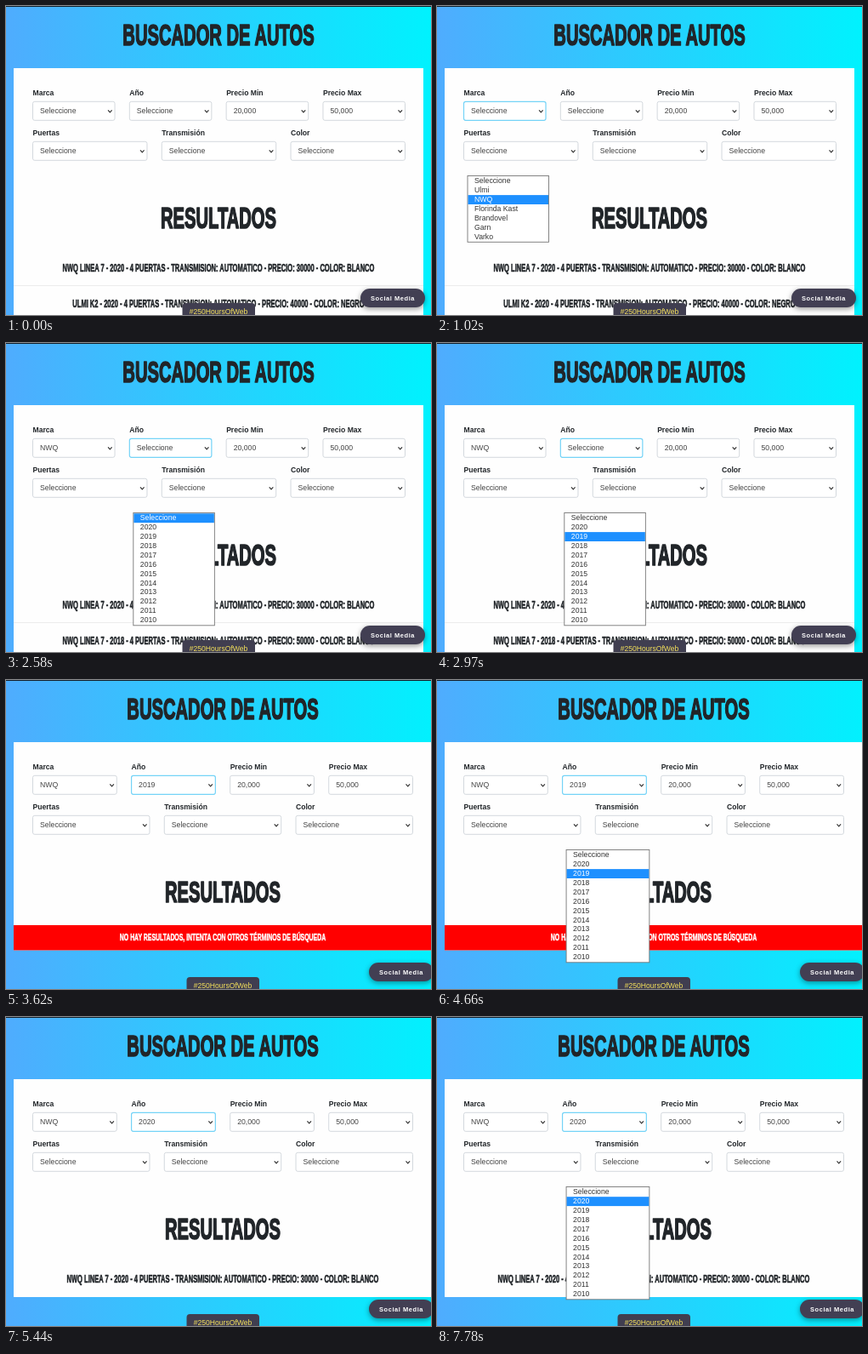
Recreate the animation shown at these times as an HTML page. Size 500 by 363 pixels, loop 8000 ms.

```html
<!DOCTYPE html>
<html lang="es">
<head>
<meta charset="utf-8">
<title>Buscador de autos</title>
<style>
  html, body { margin: 0; width: 100%; height: 100%; overflow: hidden; }
  svg { display: block; width: 100vw; height: 100vh; }
  text { font: 8.7px "Liberation Sans", Arial, sans-serif; fill: #444; white-space: pre; }
  .label { font-size: 8.6px; font-weight: bold; fill: #212529; }
  .display { font-weight: bold; text-anchor: middle; stroke-linejoin: round; }
  .pill { font-size: 7.5px; font-weight: bold; letter-spacing: .55px; fill: #fff; }
  .tag { font-size: 8.6px; fill: #f3e05a; text-anchor: middle; }
  .shadow { filter: drop-shadow(0 2px 3px #0006); }
</style>
</head>
<body>
<svg viewBox="0 0 500 363" preserveAspectRatio="none"></svg>
<script>
const LOOP = 8000, DARK = '#212529', NONE = 'Seleccione';
const svg = document.querySelector('svg');

const BRANDS = [NONE, 'Ulmi', 'NWQ', 'Florinda Kast', 'Brandovel', 'Garn', 'Varko'];
const YEARS = [NONE, ...Array.from({ length: 11 }, (_, i) => String(2020 - i))];

const car = (model, year, price, color) =>
  `${model} - ${year} - 4 PUERTAS - TRANSMISION: AUTOMATICO - PRECIO: ${price} - COLOR: ${color}`;
const WHITE_CAR = car('NWQ LINEA 7', 2020, 30000, 'BLANCO');
const ALL = [WHITE_CAR, car('ULMI K2', 2020, 40000, 'NEGRO')];
const BRAND = [WHITE_CAR, car('NWQ LINEA 7', 2018, 50000, 'BLANCO')];

// Each step overrides the previous state; focus 0 = brand, 1 = year; hover = open list item
const steps = [
  [0, { brand: NONE, year: NONE, focus: -1, hover: -1, cars: ALL }],
  [500, { focus: 0, hover: 0 }],
  [890, { hover: 1 }],
  [1020, { hover: 2 }],
  [1930, { brand: 'NWQ', hover: -1, cars: BRAND }],
  [2580, { focus: 1, hover: 0 }],
  [2840, { hover: 1 }],
  [2970, { hover: 2 }],
  [3620, { year: '2019', hover: -1, cars: [] }],
  [4660, { hover: 2 }],
  [4920, { hover: 0 }],
  [5180, { hover: 1 }],
  [5440, { year: '2020', hover: -1, cars: [WHITE_CAR] }],
  [7780, { hover: 1 }],
];

const rect = (x, y, w, h, fill, extra = '') =>
  `<rect x="${x}" y="${y}" width="${w}" height="${h}" fill="${fill}" ${extra}/>`;
const text = (x, y, str, extra = '') => `<text x="${x}" y="${y}" ${extra}>${str}</text>`;

// Condensed heavy headline face
const display = (x, y, size, str, color = DARK) =>
  `<g transform="translate(${x} ${y}) scale(.585 1)">` +
  text(0, 0, str, `class="display" stroke="${color}" stroke-width="${size * .05}"
    style="font-size:${size}px;fill:${color}"`) + '</g>';

function field(x, y, w, label, value, focused) {
  const border = focused
    ? 'stroke="#74d3f7" stroke-width="1.2"'
    : 'stroke="#ced4da" stroke-width=".9"';
  return text(x, y - 7, label, 'class="label"') +
    rect(x, y + .3, w, 22, '#fff', `rx="2.2" ${border}`) +
    text(x + 8.5, y + 14.4, value) +
    `<path d="M${x + w - 8} ${y + 10.3}l2.3 2.5 2.3-2.5" fill="none" stroke="#333" stroke-width="1.2"/>`;
}

function list(x, w, items, hover) {
  const pitch = 10.9, top = 199.5;
  return rect(x, top, w, items.length * pitch + 1.5, '#fff', 'stroke="#777" stroke-width=".9"') +
    rect(x + .5, top + .8 + hover * pitch, w - 1, pitch, '#1e90ff') +
    items.map((item, i) => text(x + 8, top + 8.7 + i * pitch, item,
      `style="fill:${i === hover ? '#fff' : '#333'}"`)).join('');
}

function render({ brand, year, focus, hover, cars }) {
  // A short page has no scrollbar, so the layout is wider
  const short = cars.length < 2;
  const extra = short ? 10 : 0, mid = 250 + extra / 2;
  const left = 31.5, gap = 17.3, inner = short ? 447 : 438;
  const bottom = short ? (cars.length ? 329 : 317.5) : 363;

  const row = (y, fields) => {
    const w = (inner - gap * (fields.length - 1)) / fields.length;
    return fields.map(([label, value], i) =>
      field(left + i * (w + gap), y, w, label, value, y < 150 && i === focus)).join('');
  };

  let out = `<defs><linearGradient id="sky"><stop stop-color="#4facfe"/>
    <stop offset="1" stop-color="#00f2fe"/></linearGradient></defs>` +
    rect(0, 0, 500 + extra, 363, 'url(#sky)') +
    rect(0, 0, 510, 1, '#16202a') +
    display(mid, 46, 34.5, 'BUSCADOR DE AUTOS') +
    rect(9, 73, 482 + extra, bottom - 73, '#fefefe') +
    row(112, [['Marca', brand], ['Año', year], ['Precio Min', '20,000'], ['Precio Max', '50,000']]) +
    row(159, [['Puertas', NONE], ['Transmisión', NONE], ['Color', NONE]]) +
    display(mid, 261, 34.5, 'RESULTADOS');

  if (!short) out += rect(9, 328, 482, 1, '#ececec');
  cars.forEach((line, i) => out += display(mid, 312.4 + i * 41.4, 12.9, line));
  if (!cars.length) {
    out += rect(9, 288, 482 + extra, 29.5, '#f00') +
      display(mid, 306, 11.8, 'NO HAY RESULTADOS, INTENTA CON OTROS TÉRMINOS DE BÚSQUEDA', '#fff');
  }

  out += rect(mid - 42.5, 349, 85.5, 20, '#403e50', 'rx="4"') +
    text(mid, 362, '#250HoursOfWeb', 'class="tag"') +
    rect(417 + extra, 332, 76, 22, '#423f53', 'rx="11" class="shadow"') +
    text(429 + extra, 345.8, 'Social Media', 'class="pill"');

  if (hover >= 0) {
    const w = (inner - gap * 3) / 4;
    out += list(left + focus * (w + gap) + 4.5, w - 1, focus ? YEARS : BRANDS, hover);
  }
  svg.innerHTML = out;
}

let shown = -1;
function tick() {
  const time = performance.now() % LOOP;
  const current = steps.findLastIndex(([start]) => start <= time);
  if (current !== shown) {
    shown = current;
    render(Object.assign({}, ...steps.slice(0, current + 1).map(([, change]) => change)));
  }
  requestAnimationFrame(tick);
}
tick();
</script>
</body>
</html>
```
